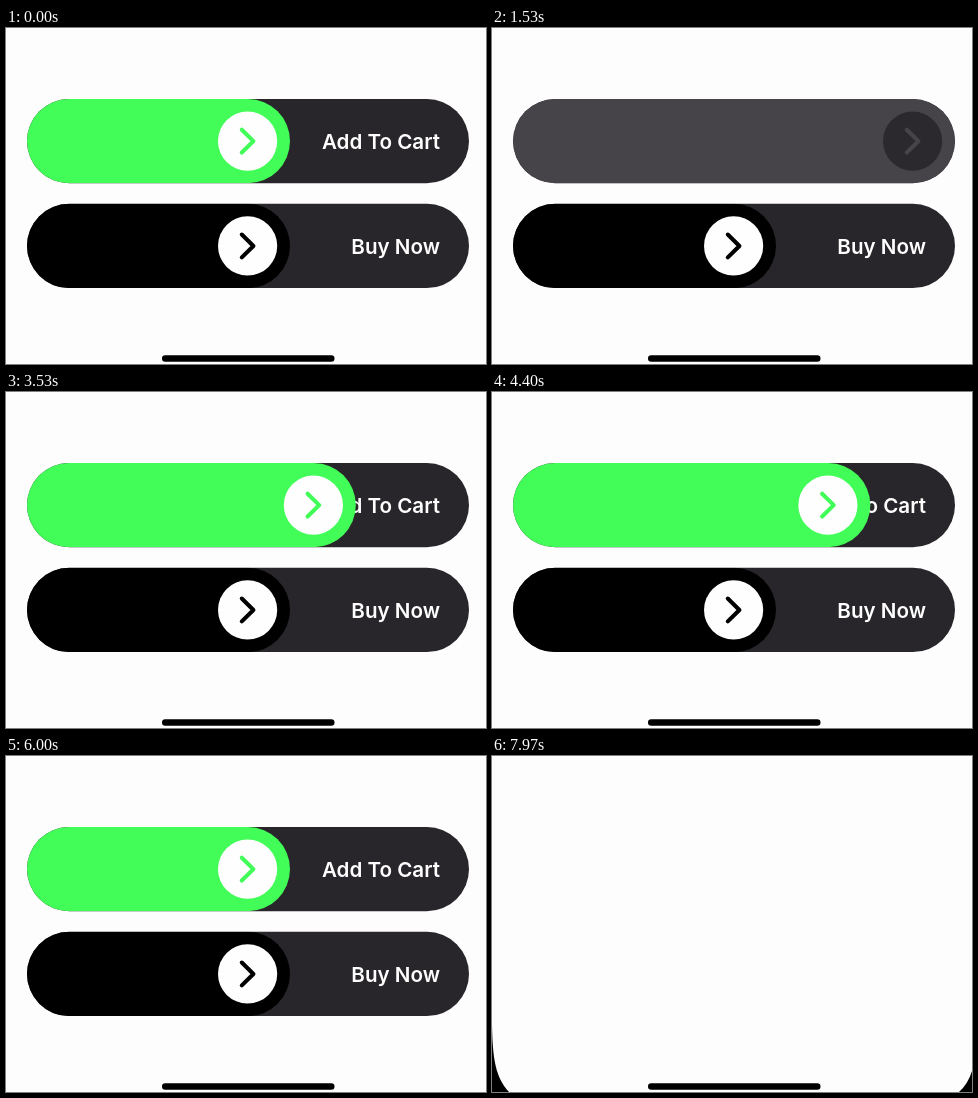
An HTML page with a canvas for the animation above (8000 ms loop, 480x336 px).

```html
<!DOCTYPE html>
<html lang="en">
<head>
<meta charset="utf-8">
<title>Slide buttons</title>
<style>
  html, body { margin: 0; width: 100%; height: 100%; overflow: hidden; background: #fdfdfd; }
  canvas { display: block; width: 480px; height: 336px; }
</style>
</head>
<body>
<canvas id="stage"></canvas>
<script>
const W = 480, H = 336, LOOP = 8000, BLANK_AT = 7965;
const LEFT = 21, WIDTH = 442, HEIGHT = 84.3, REST = -179, OVERSHOOT = 87;
const SWIPES = [1080, 2580, 4570, 6615]; // times at which the knob reaches the end
const DRAG = 350, BACK = 680, DONE = 1143; // drag length, then start and end of the return

const PAPER = '#fdfdfd';
const TRACK = [40, 38, 42], GREEN = [66, 252, 88], GRAY = [70, 68, 73];
const WHITE = [254, 254, 254], GHOST = [43, 41, 45], BLACK = [0, 0, 0];

const canvas = document.getElementById('stage');
const ctx = canvas.getContext('2d');
const dpr = window.devicePixelRatio || 1;
canvas.width = W * dpr;
canvas.height = H * dpr;
ctx.scale(dpr, dpr);

const ramp = (t, from, to) => Math.min(1, Math.max(0, (t - from) / (to - from)));
const smooth = p => (1 - Math.cos(Math.PI * p)) / 2;
const mix = (a, b, p) => a.map((v, i) => v + (b[i] - v) * p);
const rgb = c => `rgb(${c.map(Math.round).join(',')})`;

function pill(x, y, w, h) {
  ctx.beginPath();
  ctx.roundRect(x, y, w, h, h / 2);
}

// Fill offset and dimming, t ms after the knob reaches the end.
function swipeState(t) {
  let offset = REST * (1 - smooth(ramp(t, -DRAG, 0)));
  offset += OVERSHOOT * Math.sin(Math.PI * ramp(t, 0, 300)) ** 2;
  offset += REST * smooth(ramp(t, BACK, DONE));
  const dim = ramp(t, 60, 285) - ramp(t, BACK, BACK + 180);
  return { offset, dim };
}

function stateAt(t) {
  const at = SWIPES.find(s => t >= s - DRAG && t < s + DONE);
  return at === undefined ? { offset: REST, dim: 0 } : swipeState(t - at);
}

function slider(y, label, offset, fill, knob) {
  const mid = y + HEIGHT / 2;
  const knobX = LEFT + WIDTH + offset - 42.4;

  ctx.save();
  pill(LEFT, y, WIDTH, HEIGHT);
  ctx.fillStyle = rgb(TRACK);
  ctx.fill();
  ctx.clip();

  ctx.fillStyle = rgb(WHITE);
  ctx.font = '600 20.6px Inter, Roboto, sans-serif';
  ctx.textAlign = 'right';
  ctx.fillText(label, 434, mid + 7.8);

  pill(LEFT + offset, y, WIDTH, HEIGHT);
  ctx.fillStyle = rgb(fill);
  ctx.fill();

  ctx.beginPath();
  ctx.arc(knobX, mid, 29.6, 0, Math.PI * 2);
  ctx.fillStyle = rgb(knob);
  ctx.fill();

  ctx.beginPath();
  ctx.moveTo(knobX - 5.8, mid - 11.4);
  ctx.lineTo(knobX + 5.8, mid);
  ctx.lineTo(knobX - 5.8, mid + 11.4);
  ctx.lineWidth = 4.1;
  ctx.lineCap = ctx.lineJoin = 'round';
  ctx.strokeStyle = rgb(fill);
  ctx.stroke();
  ctx.restore();
}

function screenCorners() {
  ctx.fillStyle = '#000';
  ctx.beginPath();
  ctx.moveTo(0, 268);
  ctx.bezierCurveTo(0.5, 304, 4, 322, 17, H);
  ctx.lineTo(0, H);
  ctx.fill();
  ctx.beginPath();
  ctx.moveTo(W, 315);
  ctx.quadraticCurveTo(476, 328, 467, H);
  ctx.lineTo(W, H);
  ctx.fill();
}

function draw(t) {
  ctx.fillStyle = PAPER;
  ctx.fillRect(0, 0, W, H);

  if (t < BLANK_AT) {
    const { offset, dim } = stateAt(t);
    slider(71, 'Add To Cart', offset, mix(GREEN, GRAY, dim), mix(WHITE, GHOST, dim));
    slider(175.8, 'Buy Now', REST, BLACK, WHITE);
  } else {
    screenCorners();
  }

  pill(156, 327.3, 172.5, 6.4);
  ctx.fillStyle = '#000';
  ctx.fill();
}

const start = performance.now();
function tick() {
  draw((performance.now() - start) % LOOP);
  requestAnimationFrame(tick);
}
tick();
</script>
</body>
</html>
```
